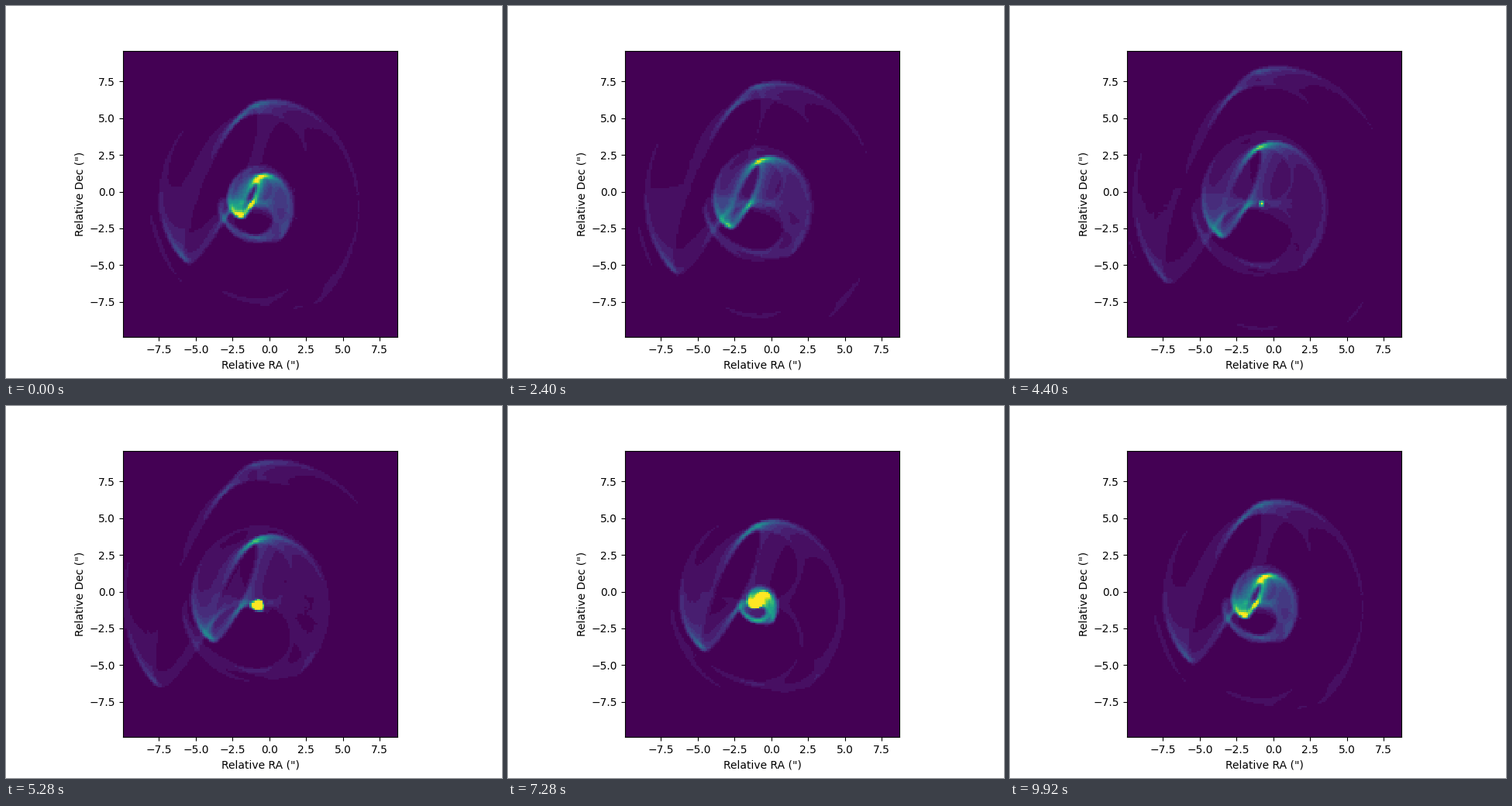
These frames come from a looping animation (640 px wide and 480 px high, 10 s). A matplotlib script:

```python
import numpy as np
import matplotlib.pyplot as plt
from matplotlib.animation import FuncAnimation

FRAMES = 125
INTERVAL = 80
PERIOD = 10.0                       # seconds of animation per orbit

# view, in arcseconds
LEFT, RIGHT, BOTTOM, TOP = -9.955, 8.715, -9.89, 9.59
NX, NY = 150, 156
CX, CY = -0.82, -0.83

# binary orbit and dust cone
ECC = 0.73
PERIASTRON = 5.1
DUST_ON, DUST_OFF = np.radians([-114, 152])
CONE = np.radians(62)
TILT = np.radians(27)
TILT_DIR = np.radians(91)
SPEED = 0.52
X_SQUEEZE = 0.9
MAX_AGE = 2 * PERIOD
RINGS, PER_RING = 1000, 180
LEVELS = 24


def eccentric(nu):
    return 2 * np.arctan(np.sqrt((1 - ECC) / (1 + ECC)) * np.tan(nu / 2))


def true_anomaly(e):
    return 2 * np.arctan(np.sqrt((1 + ECC) / (1 - ECC)) * np.tan(e / 2))


def make_dust():
    """Sky velocities and emission times of all dust points of one orbit."""
    e = np.linspace(eccentric(DUST_ON), eccentric(DUST_OFF), 5000)
    mean = e - ECC * np.sin(e)
    even = np.linspace(mean[0], mean[-1], RINGS)
    nu = true_anomaly(np.interp(even, mean, e))[:, None]
    born = PERIASTRON + even * PERIOD / (2 * np.pi)

    shift = (np.arange(RINGS) * 0.618034) % 1
    phi = 2 * np.pi * (np.arange(PER_RING) + shift[:, None]) / PER_RING
    side = np.sin(CONE) * np.cos(phi)
    height = np.sin(CONE) * np.sin(phi)
    px = np.cos(CONE) * np.cos(nu) - side * np.sin(nu)
    py = np.cos(CONE) * np.sin(nu) + side * np.cos(nu)

    # tilt the orbital plane about its line of nodes
    mx, my = np.cos(TILT_DIR), np.sin(TILT_DIR)
    along = px * mx + py * my
    push = along * (np.cos(TILT) - 1) + height * np.sin(TILT)
    vx = SPEED * X_SQUEEZE * (px + push * mx)
    vy = SPEED * (py + push * my)
    return vx, vy, born


VX, VY, BORN = make_dust()


def blur(h):
    h = np.pad(h, 1)
    h = 0.25 * h[:-2] + 0.5 * h[1:-1] + 0.25 * h[2:]
    return 0.25 * h[:, :-2] + 0.5 * h[:, 1:-1] + 0.25 * h[:, 2:]


def column(t, shells=(0, 1, 2)):
    """Dust column density at time t, summed over the given shells."""
    total = np.zeros(NX * NY)
    for n in shells:
        age = t - BORN + n * PERIOD
        live = (age > 0) & (age < MAX_AGE)
        if not live.any():
            continue
        age = age[live][:, None]
        ix = (CX + age * VX[live] - LEFT) * (NX / (RIGHT - LEFT))
        iy = (CY + age * VY[live] - BOTTOM) * (NY / (TOP - BOTTOM))
        ok = (ix >= 0) & (ix < NX) & (iy >= 0) & (iy < NY)
        cell = iy[ok].astype(int) * NX + ix[ok].astype(int)
        total += np.bincount(cell, minlength=NX * NY)
    return blur(total.reshape(NY, NX))


# brightness scale from a half-grown shell: its knots and typical column
ref = column(3.6, shells=(1,))
PEAK = np.sort(ref, axis=None)[-4:].mean()
TYPICAL = np.median(ref[ref > 0])
GAMMA = np.clip(np.log(0.85 / 0.065) / np.log(PEAK / TYPICAL), 0.75, 1)


def image_at(i):
    t = PERIOD * i / (FRAMES - 1)
    value = 0.85 * (column(t) / PEAK) ** GAMMA
    return np.clip(np.floor(value * LEVELS) / LEVELS, 0, 1)


fig, ax = plt.subplots(figsize=(6.4, 4.8), dpi=100)
img = ax.imshow(image_at(0), origin="lower", cmap="viridis", vmin=0, vmax=1,
                extent=(LEFT, RIGHT, BOTTOM, TOP), interpolation="nearest")
ticks = np.arange(-7.5, 7.6, 2.5)
ax.set_xticks(ticks)
ax.set_yticks(ticks)
ax.set_xlabel('Relative RA (")')
ax.set_ylabel('Relative Dec (")')


def update(i):
    img.set_data(image_at(i))
    return [img]


anim = FuncAnimation(fig, update, frames=FRAMES, interval=INTERVAL,
                     repeat=True, repeat_delay=0)
plt.show()
```
